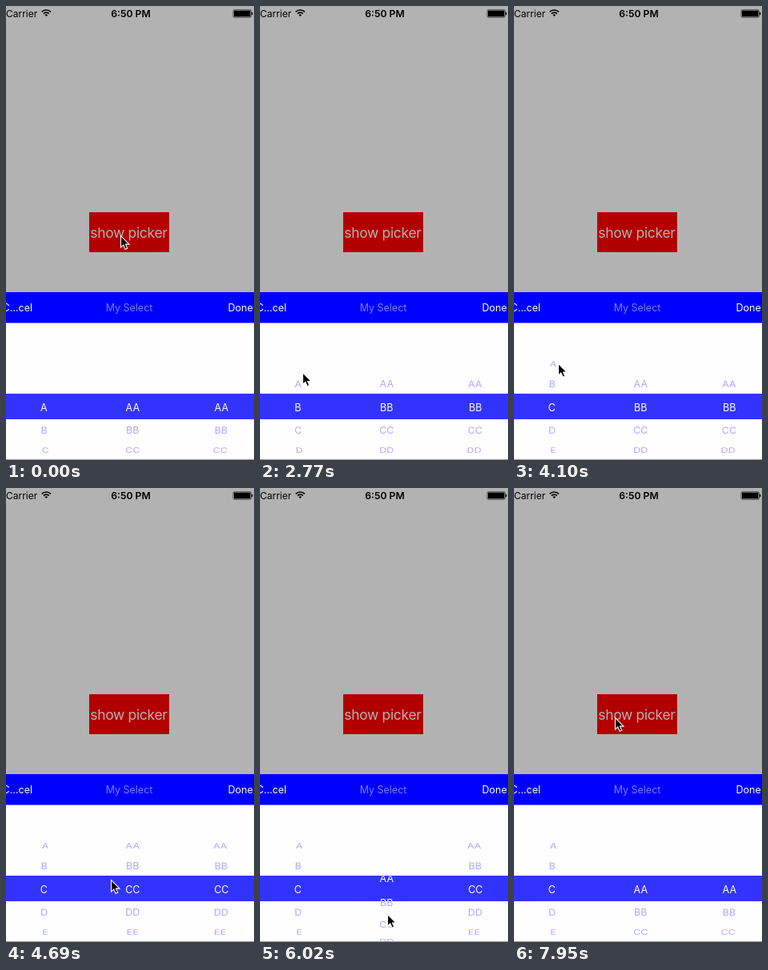
An HTML page with a canvas that plays this animation: 310x568 px, repeating every 8000 ms.

```html
<!DOCTYPE html>
<html lang="en">
<head>
<meta charset="utf-8">
<title>Linked picker</title>
<style>
  html, body { margin: 0; width: 100%; height: 100%; overflow: hidden; background: #b2b2b2; }
  canvas { display: block; }
</style>
</head>
<body>
<canvas id="stage" width="310" height="568"></canvas>
<script>
const ctx = document.getElementById('stage').getContext('2d');
const LOOP = 8000, FIRST_TICK = 838, TICK = 148;
const ROWS = 'ABCDEFG', CENTER_X = 158.3, CENTER_Y = 502, COLUMN_WIDTH = 111;
const RADIUS = 80, ROW_ANGLE = 0.372, PERSPECTIVE = 0.057;
const DRAG_SPEED = 0.39, FOLLOW_SPEED = 1; // rows per tick
const GLIDE = 3; // longest pointer move, in ticks
const PICKER = [0, 396, 310, 172], BAND = [0, 485, 310, 32];

// Dragging a column sets the same row in every column to its right.
const drags = [
  { tick: 10, column: 0, row: 1 },
  { tick: 20, column: 0, row: 2 },
  { tick: 33, column: 1, row: 0 }
];

// Pointer stops: tick of arrival, x, y.
const stops = [
  [0, 143, 287], [1, 90, 460], [6, 50, 483], [9, 51, 470], [11, 54, 449],
  [16, 51, 477], [21, 55, 447], [27, 131, 490], [31, 158, 484],
  [36, 159, 533], [42, 179, 527], [46, 229, 538], [49, 126, 287]
];

const clamp = (v, low, high) => Math.max(low, Math.min(high, v));

function wheelRow(column, tick) {
  let row = 0;
  for (const drag of drags) {
    if (column < drag.column) continue;
    const distance = drag.row - row;
    const dragTicks = Math.ceil(Math.abs(distance) / DRAG_SPEED);
    const follows = column > drag.column;
    const start = drag.tick + (follows ? dragTicks + 1 : 0);
    if (tick < start) break;
    const reach = (tick - start + 1) * (follows ? FOLLOW_SPEED : DRAG_SPEED);
    row += clamp(distance, -reach, reach);
  }
  return row;
}

function pointerAt(tick) {
  let [last, x, y] = stops[0];
  for (const [arrival, toX, toY] of stops) {
    const glide = Math.min(GLIDE, arrival - last) || 1;
    const progress = clamp((tick - arrival) / glide + 1, 0, 1);
    x += (toX - x) * progress;
    y += (toY - y) * progress;
    last = arrival;
  }
  return [x, y];
}

function rect(color, x, y, w, h) {
  ctx.fillStyle = color;
  ctx.fillRect(x, y, w, h);
}

function text(string, x, y, size, color, { align = 'left', weight = 400, spacing = 0 } = {}) {
  ctx.font = `${weight} ${size}px Inter, Roboto, sans-serif`;
  ctx.letterSpacing = spacing + 'px';
  ctx.textAlign = align;
  ctx.fillStyle = color;
  ctx.fillText(string, x, y);
}

function drawStatusBar() {
  text('Carrier', 0, 13.5, 12, '#000');
  text('6:50 PM', 156, 13.5, 12.2, '#000', { align: 'center', weight: 600 });

  const wave = radius => ctx.arc(50.3, 13, radius, -Math.PI * 0.75, -Math.PI * 0.25);
  ctx.strokeStyle = ctx.fillStyle = '#000';
  ctx.lineWidth = 1.7;
  for (const radius of [4.8, 8]) {
    ctx.beginPath();
    wave(radius);
    ctx.stroke();
  }
  ctx.beginPath();
  ctx.moveTo(50.3, 13);
  wave(2.6);
  ctx.fill();

  ctx.lineWidth = 0.6;
  ctx.beginPath();
  ctx.roundRect(284, 4.8, 22.4, 9.4, 1.5);
  ctx.stroke();
  rect('#000', 285, 5.7, 20.4, 7.6);
  rect('#000', 307, 7.8, 1.3, 3.4);
}

function drawColumn(column, tick, color) {
  const selected = wheelRow(column, tick);
  const offset = (column - 1) * COLUMN_WIDTH;
  const side = offset * PERSPECTIVE;
  [...ROWS].forEach((letter, i) => {
    const angle = (i - selected) * ROW_ANGLE;
    if (Math.abs(angle) > 1.3) return;
    const depth = Math.cos(angle), lift = Math.sin(angle);
    ctx.save();
    ctx.transform(1, 0, -side * lift / RADIUS, depth,
      CENTER_X + offset - side * (1 - depth), CENTER_Y + RADIUS * lift);
    text(letter.repeat(column ? 2 : 1), 0, 4.5, 12.5, color, { align: 'center' });
    ctx.restore();
  });
}

function drawWheels(tick, color, background, area) {
  rect(background, ...area);
  ctx.save();
  ctx.beginPath();
  ctx.rect(...area);
  ctx.clip();
  for (let column = 0; column < 3; column++) drawColumn(column, tick, color);
  ctx.restore();
}

function drawPointer(x, y) {
  ctx.save();
  ctx.translate(x + 0.5, y + 0.5);
  const arrow = new Path2D('M0 0V14.6L3.3 11.5L5.6 16.8L8.2 15.7L6 10.6H10.5Z');
  ctx.fillStyle = '#000';
  ctx.strokeStyle = '#fff';
  ctx.lineWidth = 1.1;
  ctx.fill(arrow);
  ctx.stroke(arrow);
  ctx.restore();
}

function draw(time) {
  const tick = Math.floor((time - FIRST_TICK) / TICK) + 1;

  rect('#b2b2b2', 0, 0, 310, 568);
  drawStatusBar();
  rect('#b20000', 104, 258, 100, 50);
  text('show picker', 153.4, 289.5, 17.5, '#b2b2b2', { align: 'center', spacing: -0.34 });

  drawWheels(tick, '#a9a9ff', '#fefefe', PICKER);
  drawWheels(tick, '#fff', '#33f', BAND);
  rect('#999', 0, 567, 310, 1);

  rect('#00f', 0, 358, 310, 38.5);
  text('C…cel', 33, 381.8, 12.5, '#fff', { align: 'right' });
  text('My Select', 154, 382, 12.5, '#7c7cff', { align: 'center' });
  text('Done', 277.6, 381.8, 12.5, '#fff');

  drawPointer(...pointerAt(tick));
}

const begin = performance.now();
function play() {
  draw((performance.now() - begin) % LOOP);
  requestAnimationFrame(play);
}
play();
</script>
</body>
</html>
```
